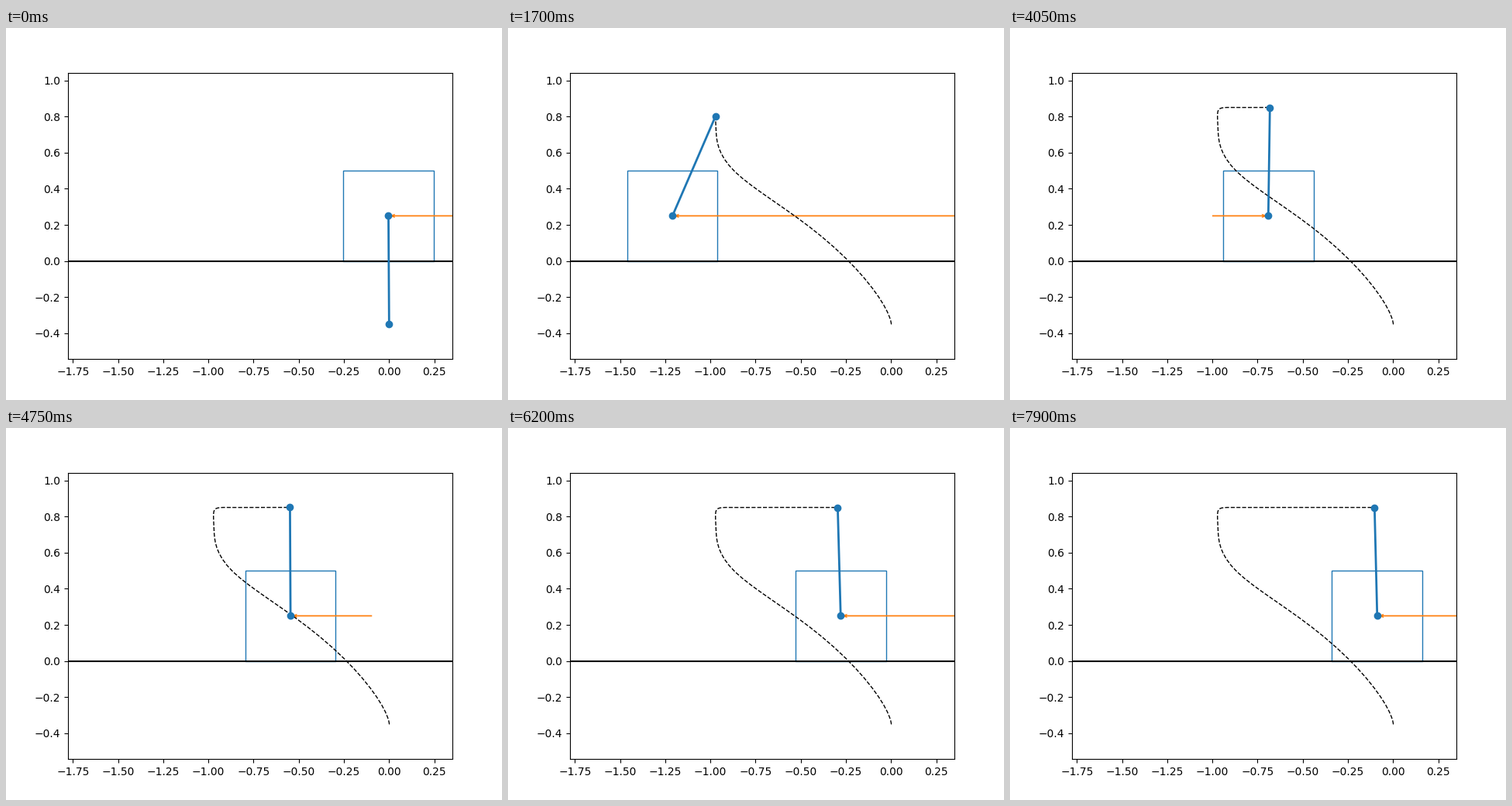
Animation, 640 px wide and 480 px high, one loop 9150 ms. Source, as a matplotlib script:

```python
import numpy as np
import matplotlib.pyplot as plt
from matplotlib.animation import FuncAnimation
from matplotlib.patches import Rectangle

FRAMES, MOVING = 183, 159
POLE, SIDE = 0.6, 0.5
PIVOT_Y = SIDE / 2
SWING_END = 55

# A few poses: swing-up, then a slow balanced drift home
KEYS = np.array([0, 6, 15, 22, 30, 38, 46, 53, 81, 109, 139, 158])
ANGLES = [.006, .49, 1.463, 1.99, 2.5, 2.925, 3.112, 3.121, 3.127, 3.162, 3.169, 3.166]
CARTS = [-.0035, -.304, -1.0434, -1.412, -1.328, -1.095, -.939, -.904, -.6905,
         -.4066, -.179, -.088]


def spline(t, keys, values):
    """Natural cubic spline through the keys, starting at rest."""
    def basis(u):
        u, k = u[:, None] / keys[-1], keys / keys[-1]
        return np.hstack([abs(u - k) ** 3 + abs(u + k) ** 3, np.ones_like(u)])

    total = np.append(np.ones(len(keys)), 0)
    weights = np.linalg.solve(np.vstack([basis(keys), total]), np.append(values, 0))
    return basis(t) @ weights


def push_at(t):
    """Full force back and forth while swinging, then a decaying correction."""
    swing = -3 * np.sign(np.sin(np.pi * (t + 12.5) / 22.5))
    balance = 13.6 * np.exp((SWING_END - t) / 10) - 0.7
    return np.where(t <= SWING_END, swing, balance)


steps = np.arange(MOVING)
angle = spline(steps, KEYS, ANGLES)
cart = spline(steps, KEYS, CARTS)
push = push_at(steps)
tip_x = cart + POLE * np.sin(angle)
tip_y = PIVOT_Y - POLE * np.cos(angle)

fig, ax = plt.subplots(figsize=(6.4, 4.8), dpi=100)
ax.set_xlim(-1.7767, 0.3503)
ax.set_ylim(PIVOT_Y - 0.7925, PIVOT_Y + 0.7925)

ax.axhline(0, color="k", lw=1.5)
box = ax.add_patch(Rectangle((0, 0), SIDE, SIDE, fill=False, ec="C0", lw=1))
arrow = ax.quiver([0], [PIVOT_Y], [1], [0], color="C1", pivot="tip",
                  units="width", width=0.0035, scale_units="x", scale=1)
trail, = ax.plot([], [], "k--", lw=1)
pole, = ax.plot([], [], "o-", color="C0", lw=2)


def update(n):
    i = min(n, MOVING - 1)
    box.set_x(cart[i] - SIDE / 2)
    arrow.set_offsets([(cart[i], PIVOT_Y)])
    arrow.set_UVC([push[i]], [0])
    trail.set_data(tip_x[:i], tip_y[:i])
    pole.set_data([cart[i], tip_x[i]], [PIVOT_Y, tip_y[i]])
    return box, arrow, trail, pole


anim = FuncAnimation(fig, update, frames=FRAMES, interval=50,
                     repeat=True, repeat_delay=0)
plt.show()
```
